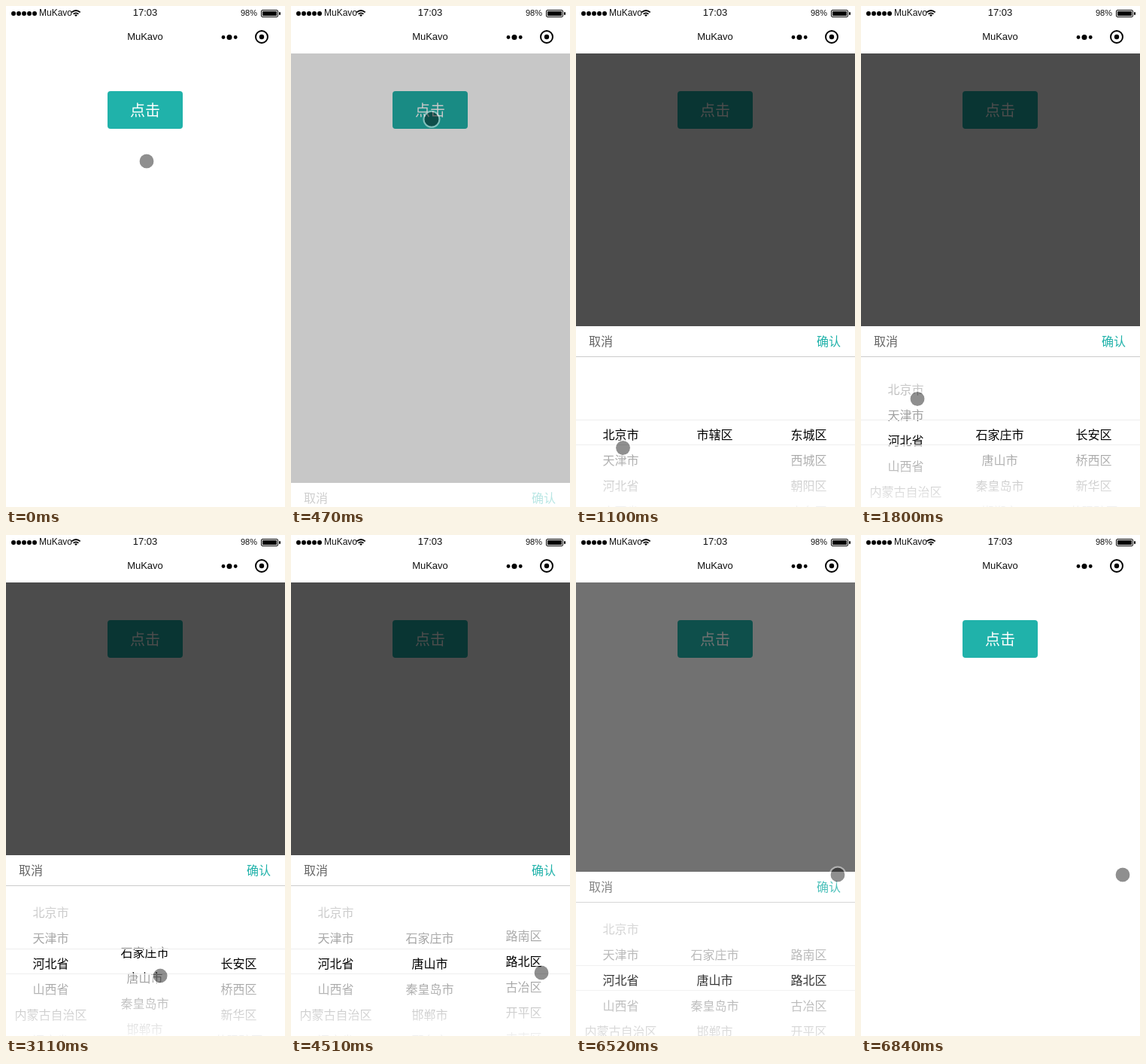
Animation of 371x665 px, one loop 7 s. Source, as an HTML page:

```html
<!DOCTYPE html>
<html lang="zh-CN">
<head>
<meta charset="utf-8">
<title>Region picker</title>
<style>
  html, body { margin: 0; width: 100%; height: 100%; overflow: hidden; background: #fff; }
  body { position: relative; font: 16px "Noto Sans CJK SC", "Noto Sans CJK", sans-serif; }
  div, span, svg { position: absolute; }
  .bar { left: 0; top: 0; width: 371px; height: 63px; background: #fff; }
  .bar span { font-family: "Liberation Sans", Arial, sans-serif; line-height: 16px; white-space: nowrap; color: #111; }
  .mid { left: 85px; width: 200px; text-align: center; }
  .btn { left: 135px; top: 113px; width: 100px; height: 50px; border-radius: 4px; background: #20b2aa;
         color: #fff; font-size: 20px; line-height: 50px; text-align: center; }
  .pop { left: 0; top: 63px; width: 371px; height: 602px; overflow: hidden; opacity: 0; }
  .shade { inset: 0; background: rgba(0, 0, 0, .7); }
  .sheet { left: 0; top: 362px; width: 371px; height: 240px; background: #fff; }
  .head { left: 0; top: 0; width: 371px; height: 40px; border-bottom: 1px solid #ccc; line-height: 39px; }
  .no { left: 17px; color: #666; }
  .yes { left: 320px; color: #20b2aa; }
  .picker { left: 0; top: 41px; width: 371px; height: 199px; overflow: hidden; }
  .col { top: 85px; width: 125px; color: #000; text-align: center; line-height: 34px; white-space: pre-line; }
  .fade { left: 0; width: 371px; box-sizing: border-box; }
  .up { top: 0; height: 84px; border-bottom: 1px solid #eee;
        background: linear-gradient(rgba(255,255,255,.95), rgba(255,255,255,.6)); }
  .down { top: 116px; height: 83px; border-top: 1px solid #eee;
          background: linear-gradient(rgba(255,255,255,.6), rgba(255,255,255,.95)); }
  .touch { left: -11.5px; top: -11.5px; width: 19px; height: 19px; border-radius: 50%;
           border: 2px solid rgba(255,255,255,.45); background: rgba(0,0,0,.44); background-clip: padding-box; }
</style>
</head>
<body>
<div class="btn">点击</div>

<div class="pop" id="pop">
  <div class="shade"></div>
  <div class="sheet" id="sheet">
    <div class="head"><span class="no">取消</span><span class="yes">确认</span></div>
    <div class="picker" id="picker">
      <div class="fade up"></div>
      <div class="fade down"></div>
    </div>
  </div>
</div>

<div class="bar">
  <span style="left:44px;top:1px;font-size:12px">MuKavo</span>
  <span class="mid" style="top:1px;font-size:13px">17:03</span>
  <span style="left:312px;top:1px;font-size:11px">98%</span>
  <span class="mid" style="top:33px;font-size:13px">MuKavo</span>
  <svg width="371" height="63" style="left:0;top:0">
    <path d="M10 10h28.2" stroke="#000" stroke-width="6" stroke-linecap="round" stroke-dasharray="0 7"/>
    <g fill="none" stroke="#000" stroke-width="1.7">
      <path d="M87.3 8.4q5.7-4.8 11.4 0"/>
      <path d="M89.5 10.7q3.5-2.8 7 0"/>
    </g>
    <path d="M91 12.1q2-1.5 4 0l-2 1.9z"/>
    <rect x="339.5" y="5.5" width="22" height="9" rx="1.5" fill="none" stroke="#000"/>
    <rect x="341" y="7" width="19" height="6"/>
    <rect x="363" y="8" width="2" height="4" rx="1"/>
    <circle cx="289" cy="41.5" r="2.4"/>
    <circle cx="297" cy="41.5" r="3.5"/>
    <circle cx="305.2" cy="41.5" r="2.4"/>
    <circle cx="340" cy="41" r="8" fill="none" stroke="#000" stroke-width="2"/>
    <circle cx="340" cy="41" r="3.2"/>
  </svg>
</div>

<div class="touch" id="touch"></div>

<script>
const LOOP = 7000, STEP = LOOP / 90;    // the screen refreshes in steps
const ROW = 34, SLOP = 5, SNAP = 160;   // row height, dead zone of a drag, settling time
const OPEN = 405, CLOSE = 6485, FADE = 300, SLIDE = 500;
const $ = id => document.getElementById(id);

const part = (t, from, length) => Math.min(1, Math.max(0, (t - from) / length));
const smooth = p => p * p * (3 - 2 * p);
const mix = (a, b, p) => a + (b - a) * p;

// the CSS "ease" curve
function ease(x) {
  let lo = 0, hi = 1, s = 0;
  for (let i = 0; i < 20; i++) {
    s = (lo + hi) / 2;
    if (.75 * s * (1 - s) + s ** 3 < x) lo = s; else hi = s;
  }
  return .3 * s * (1 - s) ** 2 + 3 * s * s * (1 - s) + s ** 3;
}
const shown = (t, length) => ease(part(t, OPEN, length)) - ease(part(t, CLOSE, length));

// finger glides: start, end, x, y
const glides = [
  [0, 233, 187, 146],
  [440, 622, 177.5, 212.5],
  [622, 1089, 62, 586],
  [1168, 1740, 74.5, 521],
  [1800, 1945, 81.5, 535.5],
  [2020, 2800, 195.5, 604.5],
  [2880, 3320, 212.5, 567.5],
  [3600, 4040, 328.5, 622.5],
  [4122, 4511, 332.5, 580.5],
  [4720, 5285, 354.5, 450.5],
  [5990, 6065, 347.5, 450.5]
];
function finger(t) {
  let pos = [186.5, 205.5];
  for (const [from, to, x, y] of glides) {
    const p = smooth(part(t, from, to - from));
    pos = [mix(pos[0], x, p), mix(pos[1], y, p)];
  }
  return pos;
}

// each column is dragged from "grab" to "drop", then settles on its row
const columns = [
  { x: 59.5, grab: 1168, drop: 1795, row: 2,
    lists: [[0, "北京市 天津市 河北省 山西省 内蒙古自治区 辽宁省 吉林省"]] },
  { x: 184.5, grab: 2880, drop: 3500, row: 1,
    lists: [[0, "市辖区"], [1640, "石家庄市 唐山市 秦皇岛市 邯郸市 邢台市 保定市"]] },
  { x: 309.5, grab: 4122, drop: 4715, row: 1,
    lists: [[0, "东城区 西城区 朝阳区 丰台区 石景山区"],
            [1640, "长安区 桥西区 新华区 井陉矿区 裕华区"],
            [3640, "路南区 路北区 古冶区 开平区 丰南区 丰润区"]] }
];
for (const c of columns) {
  c.el = document.createElement("div");
  c.el.className = "col";
  c.el.style.left = c.x - 62.5 + "px";
  $("picker").prepend(c.el);
}
function scrollOf(c, t) {
  const moved = finger(c.grab)[1] - finger(Math.min(Math.max(t, c.grab), c.drop))[1];
  return mix(Math.max(0, moved - SLOP), c.row * ROW, smooth(part(t, c.drop, SNAP)));
}

function move(el, x, y) {
  el.style.transform = `translate(${x}px, ${y}px)`;
}

function draw(now) {
  const t = Math.floor((now % LOOP + 20) / STEP) * STEP;
  $("pop").style.opacity = shown(t, FADE);
  move($("sheet"), 0, Math.round(240 * (1 - shown(t, SLIDE))));
  for (const c of columns) {
    const names = c.lists.filter(([from]) => from <= t).pop()[1].replaceAll(" ", "\n");
    if (c.el.textContent !== names) c.el.textContent = names;
    move(c.el, 0, -Math.round(scrollOf(c, t)));
  }
  move($("touch"), ...finger(t));
}

const start = performance.now();
function tick() {
  draw(performance.now() - start);
  requestAnimationFrame(tick);
}
tick();
</script>
</body>
</html>
```
